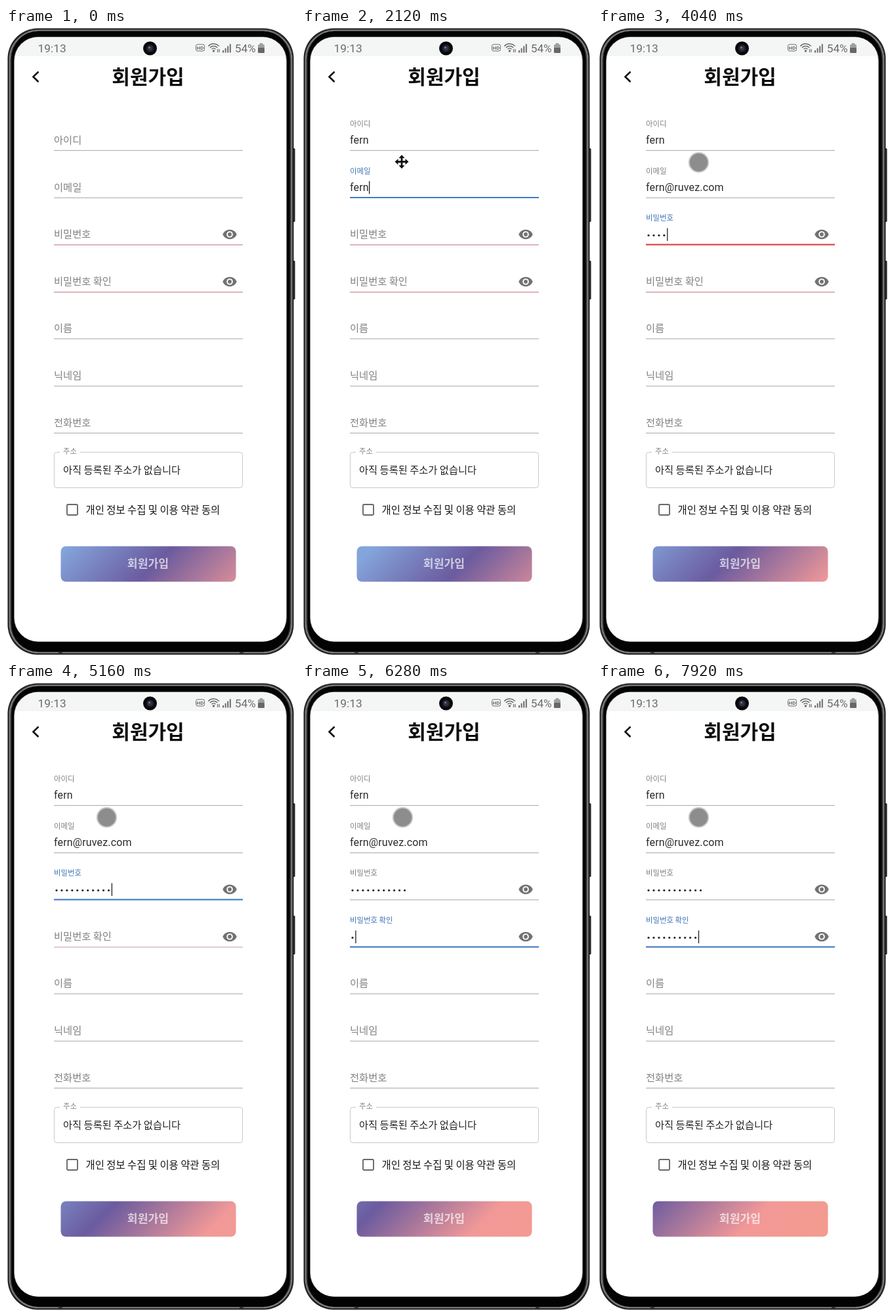
Recreate the animation shown at these times as an HTML page with a canvas. Size 442x954 px, loop 8 s.

```html
<!DOCTYPE html>
<html lang="ko">
<head>
<meta charset="utf-8">
<title>회원가입</title>
<style>
html, body { margin: 0; width: 100%; height: 100%; overflow: hidden; background: #fff; }
canvas { display: block; width: 442px; height: 954px; }
</style>
</head>
<body>
<canvas id="stage"></canvas>
<script>
const W = 442, H = 954, LOOP = 8000;
const HANGUL = '"Noto Sans CJK KR", "Noto Sans CJK JP", "Noto Sans CJK", sans-serif';
const LATIN = 'Roboto, Arial, sans-serif';
const BLUE = '#3f7cc4', RED = '#e0403e', PINK = '#cb838e', GREY = '#b4b4b4';
const LEFT = 73, RIGHT = 361;

const canvas = document.getElementById('stage');
const ctx = canvas.getContext('2d');
const dpr = window.devicePixelRatio || 1;
canvas.width = W * dpr;
canvas.height = H * dpr;

// Key times: count presses starting at start, one every gap ms.
const keys = (start, count, gap) => Array.from({ length: count }, (_, i) => start + i * gap);

const fields = [
  { label: '아이디', y: 186, focus: 320, blur: 1460, text: 'fern', keys: keys(920, 4, 120) },
  { label: '이메일', y: 258, focus: 1460, blur: 3160, text: 'fern@ruvez.com',
    keys: [...keys(1720, 4, 120), ...keys(2280, 10, 80)] },
  { label: '비밀번호', y: 329.5, focus: 3160, blur: 5720, secret: true,
    keys: [...keys(3680, 4, 110), ...keys(4200, 6, 100), 4840] },
  { label: '비밀번호 확인', y: 401.5, focus: 5720, blur: LOOP, secret: true,
    keys: [6240, ...keys(6520, 9, 155)] },
  { label: '이름', y: 472.5 },
  { label: '닉네임', y: 544.5 },
  { label: '전화번호', y: 616 }
];
const VALID_AT = 4840;

const clamp = v => Math.max(0, Math.min(1, v));
const easeOut = v => 1 - (1 - clamp(v)) ** 3;

function box(x, y, w, h, r) {
  ctx.beginPath();
  ctx.roundRect(x, y, w, h, r);
}

function fillBox(x, y, w, h, r, color) {
  box(x, y, w, h, r);
  ctx.fillStyle = color;
  ctx.fill();
}

function disc(x, y, r, color) {
  ctx.beginPath();
  ctx.arc(x, y, r, 0, Math.PI * 2);
  ctx.fillStyle = color;
  ctx.fill();
}

function write(str, x, y, size, color, { font = HANGUL, weight = 400, align = 'left', spacing = 0 } = {}) {
  ctx.font = `${weight} ${size}px ${font}`;
  ctx.letterSpacing = spacing + 'px';
  ctx.textAlign = align;
  ctx.fillStyle = color;
  ctx.fillText(str, x, y);
  const width = ctx.measureText(str).width;
  ctx.letterSpacing = '0px';
  return width;
}

// Hangul text placed by its optical middle.
const hangul = (str, x, mid, size, color, opts) => write(str, x, mid + size * 0.36, size, color, opts);

function stroke(points, width, color) {
  ctx.beginPath();
  points.forEach(([x, y], i) => i ? ctx.lineTo(x, y) : ctx.moveTo(x, y));
  ctx.lineWidth = width;
  ctx.strokeStyle = color;
  ctx.stroke();
}

function drawPhone() {
  fillBox(436, 183, 4.5, 112, 1.5, '#191919');
  fillBox(436, 354, 4.5, 59, 1.5, '#191919');
  fillBox(437.5, 185, 1, 108, 0, '#555');
  fillBox(437.5, 356, 1, 55, 0, '#555');
  fillBox(2.5, 0.5, 436, 953, 46, '#171717');
  const rings = [[4.2, 45, 1, '#4c4c4c'], [5.8, 44, 1.6, '#8b8b8b'], [7.6, 42, 1.6, '#3c3c3c']];
  for (const [inset, r, width, color] of rings) {
    box(inset, inset - 2, 441 - 2 * inset, 958 - 2 * inset, r);
    ctx.lineWidth = width;
    ctx.strokeStyle = color;
    ctx.stroke();
  }
  fillBox(8.5, 5, 424, 944, 41, '#030303');
  fillBox(12, 13.2, 416, 920.6, 37, '#8c8c8c');
  fillBox(13, 14, 414, 919.5, 36, '#fff');
  for (const x of [80, 356]) fillBox(x, 949, 6, 3, 0, '#303030');
}

function drawStatus() {
  ctx.save();
  box(13, 14, 414, 919.5, 36);
  ctx.clip();
  ctx.fillStyle = '#f4f6f5';
  ctx.fillRect(13, 14, 414, 29);
  ctx.restore();

  const ink = '#6c6c6c';
  write('19:13', 48.5, 37, 17.4, ink, { font: LATIN });
  write('54%', 348.7, 37, 17.3, ink, { font: LATIN });

  box(289.5, 25, 13, 10, 2.5);
  ctx.lineWidth = 1;
  ctx.strokeStyle = ink;
  ctx.stroke();
  write('HD', 296, 33, 8, ink, { font: LATIN, weight: 700, align: 'center' });

  ctx.lineWidth = 1.5;
  for (const r of [4, 7.5, 11]) {
    ctx.beginPath();
    ctx.arc(316.5, 35, r, -Math.PI * 0.77, -Math.PI * 0.23);
    ctx.stroke();
  }
  disc(316.5, 35, 1.7, ink);
  stroke([[322.5, 32], [322.5, 37]], 1.2, ink);
  stroke([[325, 32], [325, 37]], 1.2, ink);
  for (let i = 0; i < 4; i++) {
    ctx.fillStyle = ink;
    ctx.fillRect(330 + i * 3.6, 34 - i * 3.2, 2, 3.5 + i * 3.2);
  }
  fillBox(386.5, 23, 5, 3, 1, '#a0a0a0');
  fillBox(384, 25, 10, 13, 1.5, '#a0a0a0');
  fillBox(384, 30, 10, 8, 1.5, '#686868');

  disc(219.5, 31, 10.5, '#080808');
  disc(219.5, 31, 6, '#1c1d27');
  disc(219.5, 31, 3.8, '#303348');
  disc(218.5, 29.7, 1.3, '#8386a0');
}

function drawHeader() {
  stroke([[49.5, 66.5], [41.5, 74.3], [49.5, 82]], 2.6, '#111');
  hangul('회원가입', 216.5, 74, 30, '#0c0c0c', { weight: 700, align: 'center' });
}

const eyeShape = new Path2D('M12 4.5C7 4.5 2.73 7.61 1 12c1.73 4.39 6 7.5 11 7.5s9.27-3.11 11-7.5c-1.73-4.39-6-7.5-11-7.5z');

function drawEye(x, y) {
  ctx.save();
  ctx.translate(x, y);
  ctx.scale(0.97, 0.97);
  ctx.translate(-12, -12);
  ctx.fillStyle = '#727272';
  ctx.fill(eyeShape);
  ctx.restore();
  disc(x, y, 4.8, '#fff');
  disc(x, y, 2.9, '#727272');
}

function drawField(f, t) {
  const focused = f.focus !== undefined && t >= f.focus && t < f.blur;
  const lift = f.focus === undefined ? 0 : easeOut((t - f.focus) / 200);
  const size = 15.3 - 3.9 * lift;
  const mid = f.y - 16 - 24.5 * lift;
  hangul(f.label, LEFT, mid, size, focused ? '#4274b8' : '#818181');

  const invalid = f.secret && t < VALID_AT;
  const confirmWaiting = f.secret && f.y > 400 && t < f.focus;
  const rest = invalid ? PINK : confirmWaiting ? '#d8a9aa' : GREY;
  ctx.fillStyle = rest;
  ctx.fillRect(LEFT, f.y - 0.2, RIGHT - LEFT, 1.2);
  if (focused) {
    const half = (RIGHT - LEFT) / 2 * lift;
    ctx.fillStyle = invalid ? RED : BLUE;
    ctx.fillRect((LEFT + RIGHT) / 2 - half, f.y - 1, half * 2, 2);
  }
  if (f.secret) drawEye(341, f.y - 15.5);
  if (!f.keys) return;

  const typed = f.keys.filter(k => k <= t).length;
  let end = LEFT;
  if (f.secret) {
    for (let i = 0; i < typed; i++) disc(77 + i * 7.95, f.y - 14, 1.6, '#222');
    end += typed * 7.95;
  } else if (typed) {
    end += write(f.text.slice(0, typed), LEFT, f.y - 10, 16, '#2b2b2b', { font: LATIN, spacing: 0.15 });
  }
  if (focused) {
    const since = t - (typed ? f.keys[typed - 1] : f.focus);
    if (since % 1000 < 500) {
      ctx.fillStyle = '#222';
      ctx.fillRect(end + 0.3, f.y - 25, 1.3, 19.5);
    }
  }
}

function drawAddress() {
  box(73.5, 645.5, 287, 54, 4);
  ctx.lineWidth = 1;
  ctx.strokeStyle = '#c8c8c8';
  ctx.stroke();
  ctx.fillStyle = '#fff';
  ctx.fillRect(82, 643, 31, 5);
  hangul('주소', 87, 644, 11.4, '#858585');
  hangul('아직 등록된 주소가 없습니다', 87, 672, 15.3, '#242424');
}

function drawConsent() {
  box(93, 725, 16, 16, 1.5);
  ctx.lineWidth = 1.9;
  ctx.strokeStyle = '#686868';
  ctx.stroke();
  hangul('개인 정보 수집 및 이용 약관 동의', 121.5, 733, 15.4, '#161616');
}

function drawButton(t) {
  // The violet band drifts sideways through a 45° gradient.
  const violet = 150 + 100 * Math.cos(Math.PI * (t - 1500) / 7000);
  const from = violet - 165, span = 530;
  const g = ctx.createLinearGradient(from, 815.5, from + span / 2, 815.5 + span / 2);
  g.addColorStop(0, '#84a5dc');
  g.addColorStop(165 / span, '#6b5b9f');
  g.addColorStop(350 / span, '#f29998');
  g.addColorStop(1, '#f49c89');
  fillBox(83.5, 788.5, 267, 54, 8, g);
  hangul('회원가입', 216.5, 815, 17.2, 'rgba(255,255,255,.68)', { weight: 700, align: 'center' });
}

function drawMoveCursor(x, y) {
  ctx.save();
  ctx.translate(x, y);
  for (let i = 0; i < 4; i++) {
    ctx.rotate(Math.PI / 2);
    ctx.fillStyle = '#111';
    ctx.fillRect(-1.4, -7, 2.8, 7.5);
    ctx.beginPath();
    ctx.moveTo(0, -10.5);
    ctx.lineTo(4.5, -5.5);
    ctx.lineTo(-4.5, -5.5);
    ctx.fill();
  }
  ctx.restore();
}

function drawPointer(t) {
  if (t < 240) return;
  if (t >= 2040 && t < 2240) return drawMoveCursor(152, 203.5);
  disc(153.5, 204.5, 15.7, '#c9c9c9');
  disc(153.5, 204.5, 13.7, '#8d8d8d');
}

function draw(t) {
  ctx.setTransform(dpr, 0, 0, dpr, 0, 0);
  ctx.fillStyle = '#fff';
  ctx.fillRect(0, 0, W, H);
  drawPhone();
  drawStatus();
  drawHeader();
  fields.forEach(f => drawField(f, t));
  drawAddress();
  drawConsent();
  drawButton(t);
  drawPointer(t);
}

const start = performance.now();
function tick() {
  const t = (performance.now() - start) % LOOP;
  draw(Math.floor(t / 40) * 40);
  requestAnimationFrame(tick);
}
tick();
</script>
</body>
</html>
```
